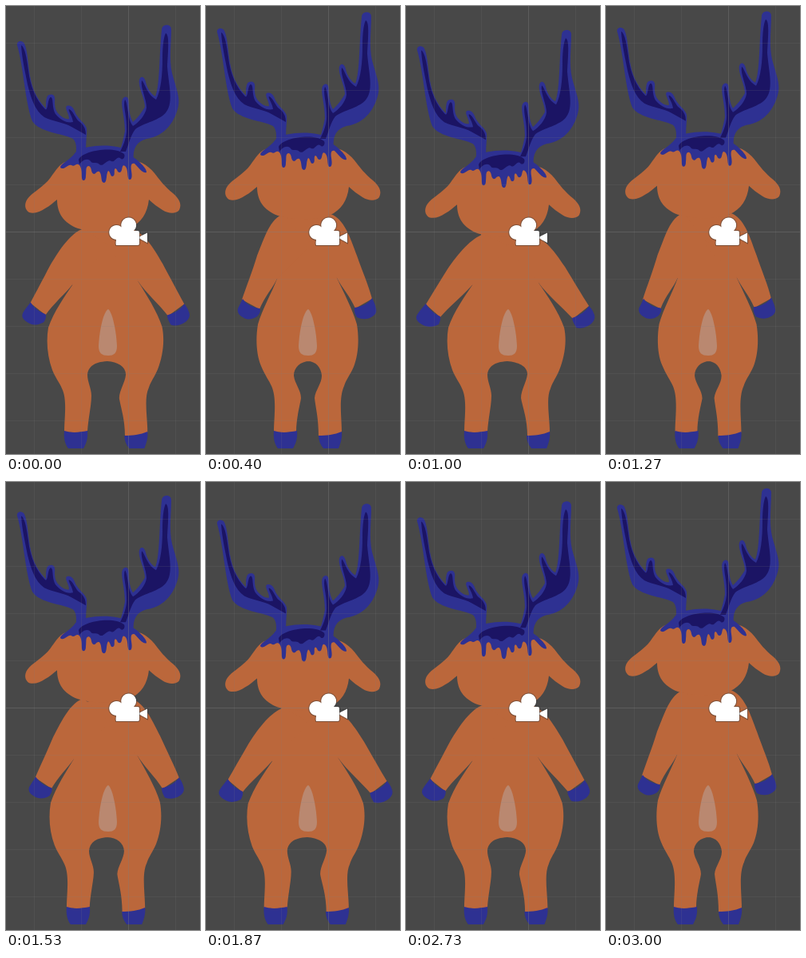
Animation of 243 by 560 pixels, one loop 3140 ms. Source, as an HTML page:

```html
<!DOCTYPE html>
<html lang="en">
<head>
<meta charset="utf-8">
<title>Idle deer</title>
<style>
  html, body { margin: 0; width: 100%; height: 100%; overflow: hidden; background: #484848; }
  svg { display: block; width: 243px; height: 560px; }
  .fur { fill: #bb673b; }
  .blue { fill: #2e3192; }
  .dark { fill: #1b1464; }
</style>
</head>
<body>
<svg viewBox="0 0 243 560">
  <g class="fur">
    <path id="leftHalf"/><path id="rightHalf"/>
    <path id="leftArm"/><path id="rightArm"/>
  </g>
  <g class="blue">
    <path id="leftHand"/><path id="rightHand"/>
    <path id="leftFoot" d="M85 531C94 534 104 533 114 531C115 541 112 548 109 553H90C86 548 84 540 85 531Z"/>
    <path id="rightFoot" d="M141 537C151 537 161 536 170 532C171 540 168 548 166 553H147C143 548 141 543 141 537Z"/>
  </g>
  <path fill="#ba8870" d="M128 379C133 382 138 405 139 425C139 434 135 437 128 437C120 437 116 434 116 425C117 405 122 382 128 379Z"/>
  <g id="head">
    <path class="fur" d="M72 180C62 186 58 198 50 205C42 213 32 218 27 225C22 232 24 239 29 242C36 244 43 241 49 237C55 234 60 229 64 226C64 243 72 255 90 262C110 268 138 268 154 262C170 255 177 243 179 226C184 231 190 235 196 239C204 244 213 244 217 239C221 231 216 224 209 218C200 211 192 201 186 193C182 188 176 183 170 180C150 172 90 172 72 180Z"/>
    <g class="blue">
      <path d="M14 33C13 28 20 26 23 31C28 42 27 58 31 76C34 92 42 104 50 112C50 104 50 96 54 95C60 93 62 97 61 104C61 110 62 115 66 119C70 123 75 126 79 125C79 118 73 112 76 109C82 107 85 112 87 118C91 126 99 130 101 137C102 146 98 160 102 178L86 178C88 168 90 156 84 150C70 143 42 142 33 128C24 105 22 60 14 33Z"/>
      <path d="M195 14C195 6 207 6 207 13C207 30 204 50 208 68C213 86 218 98 216 108C213 126 200 147 176 150C164 153 158 162 160 178L140 172C145 160 147 150 149 140C149 122 142 104 147 99C152 95 154 100 154 106C154 116 156 124 159 129C163 126 171 116 174 110C174 100 165 84 167 76C169 70 174 73 175 79C177 88 182 94 187 97C193 84 192 40 195 14Z"/>
      <path d="M68 185C70 180 80 177 87 167C99 156 141 156 153 165C156 172 162 174 166 178C170 182 176 187 176 192C172 194 167 187 161 181C157 180 156 183 157 190C158 196 158 201 155 201C151 201 154 188 149 184C144 180 147 192 142 192C139 192 140 188 137 187C134 188 138 197 133 197C130 196 131 191 128 190C125 194 127 204 123 205C118 205 121 196 117 191C113 190 113 194 110 194C106 193 108 186 104 184C99 184 101 190 100 196C100 200 99 202 97 202C93 201 97 190 92 183C88 179 86 186 82 183C78 181 74 188 70 187C69 187 68 186 68 185Z"/>
    </g>
    <g class="dark">
      <path d="M19 33C24 36 26 50 28 64C30 84 38 102 49 113C53 116 52 99 56 98C60 99 57 110 62 119C68 126 76 131 84 129C83 121 77 114 79 113C83 114 86 122 90 127C97 132 100 137 100 145C94 142 88 138 82 135C72 129 60 129 48 123C36 115 31 98 27 82C24 66 20 50 19 33Z"/>
      <path d="M200 18C205 20 203 40 202 60C204 84 210 104 201 116C194 127 172 130 162 138C156 146 154 156 150 166L143 166C148 156 152 146 151 134C151 120 146 108 149 101C153 106 152 126 159 134C166 130 175 120 176 111C176 100 168 86 170 77C174 80 176 94 188 101C194 90 196 70 196 50C196 38 197 24 200 18Z"/>
      <path d="M91 176C95 165 135 158 148 169C150 173 146 178 143 174C139 171 136 180 132 178C127 174 122 186 117 182C113 178 108 182 106 178C102 173 95 177 92 182Z"/>
    </g>
  </g>
  <g stroke="#808080">
    <path stroke-opacity=".15" d="M35.5 0V560M94.5 0V560M212.5 0V560M0 46.5H243M0 105.5H243M0 164.5H243M0 223.5H243M0 341.5H243M0 400.5H243M0 459.5H243M0 518.5H243"/>
    <path stroke-opacity=".36" d="M153.5 0V560M0 282.5H243"/>
  </g>
  <g id="camera" fill="#fff" stroke="#333" stroke-opacity=".45" stroke-width="2" paint-order="stroke">
    <path d="M165 289.500L177 283.500V296Z"/>
    <path d="M138 299C137 296 138 294 138 292A9 9 0 1 1 144.500 276.500A9.500 9.500 0 1 1 160 281H165Q167 281 167 283V297Q167 299 165 299Z"/>
  </g>
</svg>
<script>
  const LOOP = 3140, FRAME = 200 / 3, LAST = 45;
  const CYCLE = 832, FIRST_LOW = 128;

  // Head drop in pixels at times after its lowest point.
  const drop = [[0, 24.2], [42, 22], [107, 16.5], [190, 7], [272, 0], [330, -1.3],
                [375, 0], [405, 1], [569, 9], [704, 16], [800, 23.2]];

  // Each part: raised pose, lowered pose.
  const poses = {
    leftHalf: [
      "M130 258L97 262L89 341C83 357 70 380 65 398C62 416 63 436 69 450C74 462 79 468 82 475C89 490 85 515 85 532C94 534 104 533 113 532C113 515 118 498 119 490C119 480 111 472 110 462C110 452 118 444 130 444Z",
      "M130 274L95 280L83 349C74 362 60 382 53 402C50 420 52 438 58 455C62 465 66 469 70 478C77 492 73 515 73 532C84 534 93 533 102 532C103 515 107 500 107 487C107 478 102 470 102 461C103 450 112 444 130 444Z"],
    rightHalf: [
      "M127 258L156 262L164 340C172 357 184 380 189 398C192 416 191 436 185 451C180 462 175 468 173 475C166 490 170 515 170 533C160 537 150 538 141 538C141 515 137 500 136 490C137 480 145 472 145 462C144 452 138 444 127 444Z",
      "M127 280L158 285L166 346C177 362 191 382 198 402C202 420 198 440 192 455C188 465 184 469 181 478C175 490 180 515 180 533C170 537 161 538 152 538C152 515 145 498 144 490C144 480 151 470 152 460C152 450 140 445 127 444Z"],
    leftArm: [
      "M97 260C80 266 74 288 64 312C58 332 50 352 45 367L67 379C74 362 84 352 89 341L130 300Z",
      "M97 285C82 290 66 308 52 329C42 345 33 360 25 373L43 389C54 376 70 363 81 351L130 300Z"],
    rightArm: [
      "M156 260C173 266 180 288 189 312C196 332 204 350 208 366L187 378C180 362 170 352 164 340L125 300Z",
      "M156 285C171 288 184 303 199 326C210 344 220 361 229 375L209 391C196 377 178 362 166 346L125 300Z"],
    leftHand: [
      "M46 366C50 372 58 377 67 378C69 380 68 384 64 388C58 392 52 393 46 389C40 386 39 381 40 378C42 374 44 370 46 366Z",
      "M25 372C29 379 36 385 43 388C44 392 42 396 41 398C34 402 26 402 20 398C13 394 12 390 14 386C17 381 21 377 25 372Z"],
    rightHand: [
      "M208 365C204 371 196 376 186 377C185 381 187 386 189 389C195 392 202 392 207 389C213 386 214 382 213 378C212 373 210 369 208 365Z",
      "M229 375C226 381 217 387 208 390C208 394 211 398 213 402C220 404 227 401 232 397C237 392 237 388 235 384C234 381 232 378 229 375Z"]
  };

  const el = id => document.getElementById(id);

  function blend(from, to, k) {
    const end = to.match(/\d+/g);
    let i = 0;
    return from.replace(/\d+/g, n => (+n + (end[i++] - n) * k).toFixed(2) + " ");
  }

  function knot(i) {
    const n = drop.length, wrap = Math.floor(i / n);
    const [s, v] = drop[i - wrap * n];
    return [s + wrap * CYCLE, v];
  }

  function slope(i) {
    const [s0, v0] = knot(i - 1), [s1, v1] = knot(i + 1);
    return (v1 - v0) / (s1 - s0);
  }

  function dropAt(time) {
    const s = (time - FIRST_LOW + CYCLE) % CYCLE;
    let i = 0;
    while (knot(i + 1)[0] <= s) i++;
    const [s0, v0] = knot(i), [s1, v1] = knot(i + 1);
    const h = s1 - s0, u = (s - s0) / h, w = 1 - u;
    return w * w * ((1 + 2 * u) * v0 + u * h * slope(i))
         + u * u * ((1 + 2 * w) * v1 - w * h * slope(i + 1));
  }

  function render(time) {
    const step = Math.min(LAST, Math.floor((time % LOOP + 4) / FRAME));
    const d = dropAt(step * FRAME);
    const k = d / 22;
    const leftSpread = (1.296 * d - 0.0341 * d * d) / 12;
    for (const id in poses) {
      el(id).setAttribute("d", blend(...poses[id], id === "leftHalf" ? leftSpread : k));
    }
    el("leftFoot").setAttribute("transform", `translate(${-12 * leftSpread} 0)`);
    el("rightFoot").setAttribute("transform", `translate(${10 * k} 0)`);
    el("head").setAttribute("transform", `translate(0 ${d})`);
  }

  const start = performance.now();
  function tick() {
    render(performance.now() - start);
    requestAnimationFrame(tick);
  }
  tick();
</script>
</body>
</html>
```
